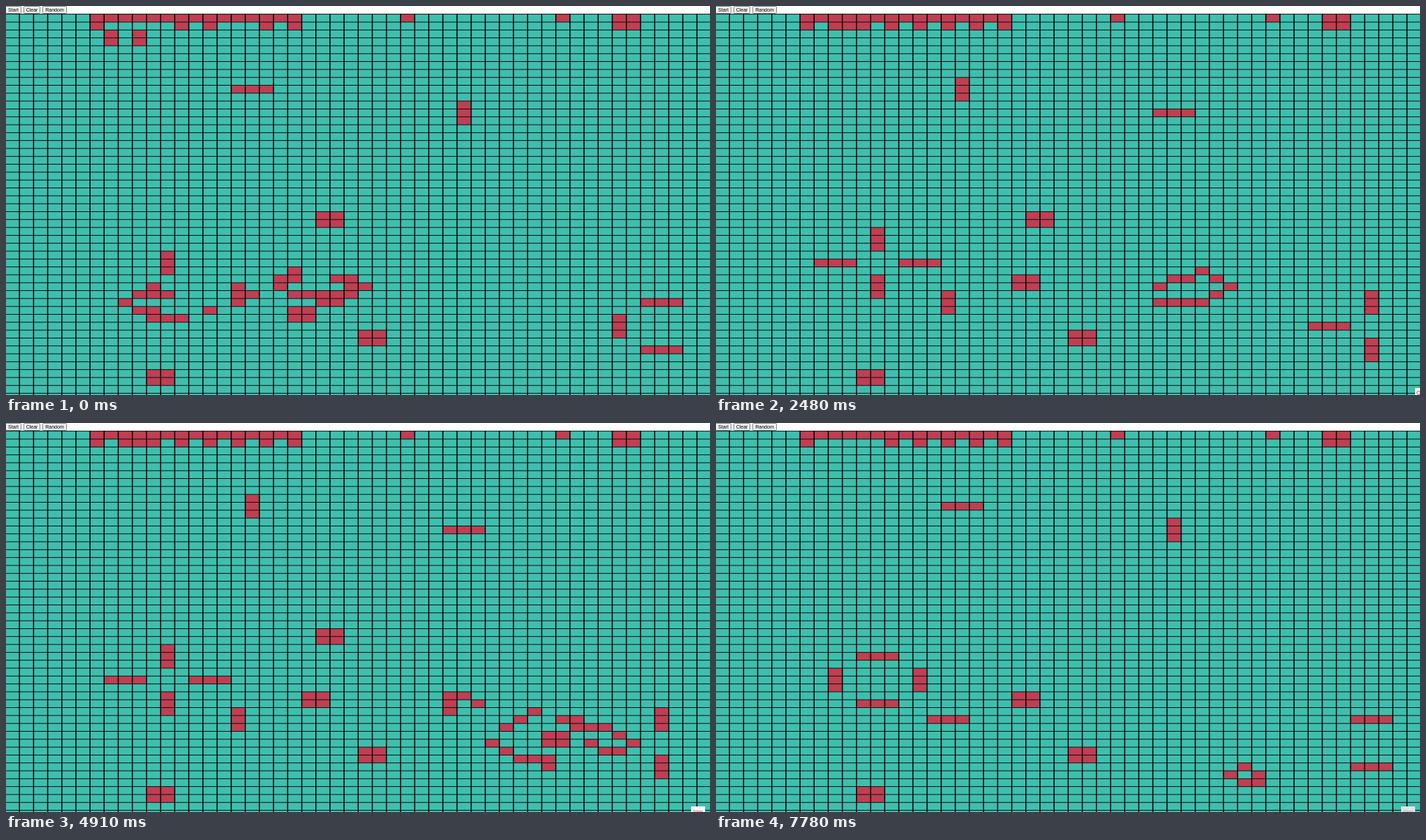
An HTML page with a canvas that plays this animation: 1006x557 px, repeating every 7.86 s.

```html
<!DOCTYPE html>
<html lang="en">
<head>
<meta charset="utf-8">
<title>Game of Life</title>
<style>
  html, body { margin: 0; width: 100%; height: 100%; overflow: hidden; background: #fff; }
  body { position: relative; font: 7px/10px "Liberation Sans", Arial, sans-serif; }
  canvas { position: absolute; left: 0; top: 0; display: block; }
  .button {
    position: absolute; top: 0; height: 11px; box-sizing: border-box;
    border: 0.7px solid #858585; border-radius: 1.5px;
    background: #efefef; color: #000; text-align: center; white-space: nowrap;
  }
  .tag { position: absolute; overflow: hidden; background: #fff; visibility: hidden; }
  #corner { left: 999px; top: 547px; width: 7px; height: 10px; }
  #corner::after {
    content: ""; position: absolute; left: 2px; top: 4px; width: 4px; height: 4px;
    border: 0.8px solid #a66; border-radius: 50%;
  }
  #stop { left: 979px; top: 549px; width: 20px; height: 8px; color: #d8323c; text-align: center; line-height: 16px; }
  #stop.faded { background: #dfe7e5; color: #a3a3a3; }
</style>
</head>
<body>
<canvas id="board" width="1006" height="557"></canvas>
<div class="button" style="left:-1px;width:23px">Start</div>
<div class="button" style="left:25px;width:24px">Clear</div>
<div class="button" style="left:52px;width:35px">Random</div>
<div class="tag" id="corner"></div>
<div class="tag" id="stop">Stop</div>
<script>
const WIDTH = 1006, HEIGHT = 557, COLS = 50, ROWS = 49;
const TEAL = '#40bead', RED = '#bf3f53';

// The screen refreshes in steps; the game runs a little slower, so some steps bring no new generation.
const LOOP = 7860, FIRST_STEP = 115, STEP = 78.2, LAST_STEP = 98, STEPS_PER_PAUSE = 4.6;
const stepAt = t => Math.min(LAST_STEP, Math.floor((t - FIRST_STEP) / STEP));
const generationAt = step => step + 1 - Math.floor((step + 1.1) / STEPS_PER_PAUSE);

const emptyGrid = () => Array.from({ length: ROWS }, () => new Uint8Array(COLS));

function startingGrid() {
  const grid = emptyGrid();
  const stamp = (w, h, ...corners) => {
    for (const [col, row] of corners)
      for (let r = row; r < row + h; r++) grid[r].fill(1, col, col + w);
  };
  stamp(15, 1, [6, 0]);
  stamp(5, 1, [20, 35]);
  stamp(3, 1, [16, 9], [45, 36], [45, 42], [9, 35], [10, 38]);
  stamp(1, 3, [32, 11], [11, 30], [43, 38], [16, 34]);
  stamp(2, 2, [43, 0], [22, 25], [25, 40], [10, 45], [20, 37]);
  stamp(2, 1, [19, 33], [23, 33], [24, 34], [22, 36], [9, 37]);
  stamp(1, 2, [6, 0], [12, 0], [14, 0], [18, 0], [20, 0], [7, 2], [9, 2], [20, 32], [19, 33]);
  stamp(1, 1, [28, 0], [39, 0], [10, 34], [17, 35], [8, 36], [14, 37]);
  return grid;
}

function neighbours(grid, r, c) {
  let sum = -grid[r][c];
  for (let y = r - 1; y <= r + 1; y++)
    for (let x = c - 1; x <= c + 1; x++) sum += grid[y]?.[x] || 0;
  return sum;
}

// The top row is never updated, so it keeps feeding the rows below it.
const nextGeneration = grid => grid.map((row, r) => r === 0 ? row : row.map((alive, c) => {
  const n = neighbours(grid, r, c);
  return n === 3 || (alive && n === 2) ? 1 : 0;
}));

const generations = [startingGrid()];
while (generations.length <= generationAt(LAST_STEP)) generations.push(nextGeneration(generations.at(-1)));

const ctx = document.getElementById('board').getContext('2d');
const corner = document.getElementById('corner');
const stop = document.getElementById('stop');
const colX = c => c * 20.17 - 0.95;
const rowY = r => r * 11.31 + 11.7;

function drawBoard(grid) {
  const top = rowY(0) - 0.5;
  ctx.clearRect(0, 0, WIDTH, HEIGHT);
  ctx.fillStyle = TEAL;
  ctx.fillRect(0, top, WIDTH, HEIGHT);
  ctx.fillStyle = RED;
  grid.forEach((row, r) => row.forEach((alive, c) => {
    if (alive) ctx.fillRect(colX(c), rowY(r), colX(1) - colX(0), rowY(1) - rowY(0));
  }));
  ctx.fillStyle = '#000';
  for (let c = 1; c < COLS; c++) ctx.fillRect(colX(c) - 0.75, top, 1.5, HEIGHT);
  for (let r = 0; r < ROWS; r++) ctx.fillRect(0, rowY(r) - 0.45, WIDTH, 0.9);
}

const show = (el, visible) => { el.style.visibility = visible ? 'visible' : 'hidden'; };

let shown = null;
function render(t) {
  const step = Math.max(-1, stepAt(t));
  if (step === shown) return;
  shown = step;
  drawBoard(generations[generationAt(step)]);
  show(corner, step >= 4 && step < 33);
  show(stop, step >= 45);
  stop.classList.toggle('faded', step === LAST_STEP);
}

const start = performance.now();
(function loop() {
  render((performance.now() - start) % LOOP);
  requestAnimationFrame(loop);
})();
</script>
</body>
</html>
```
